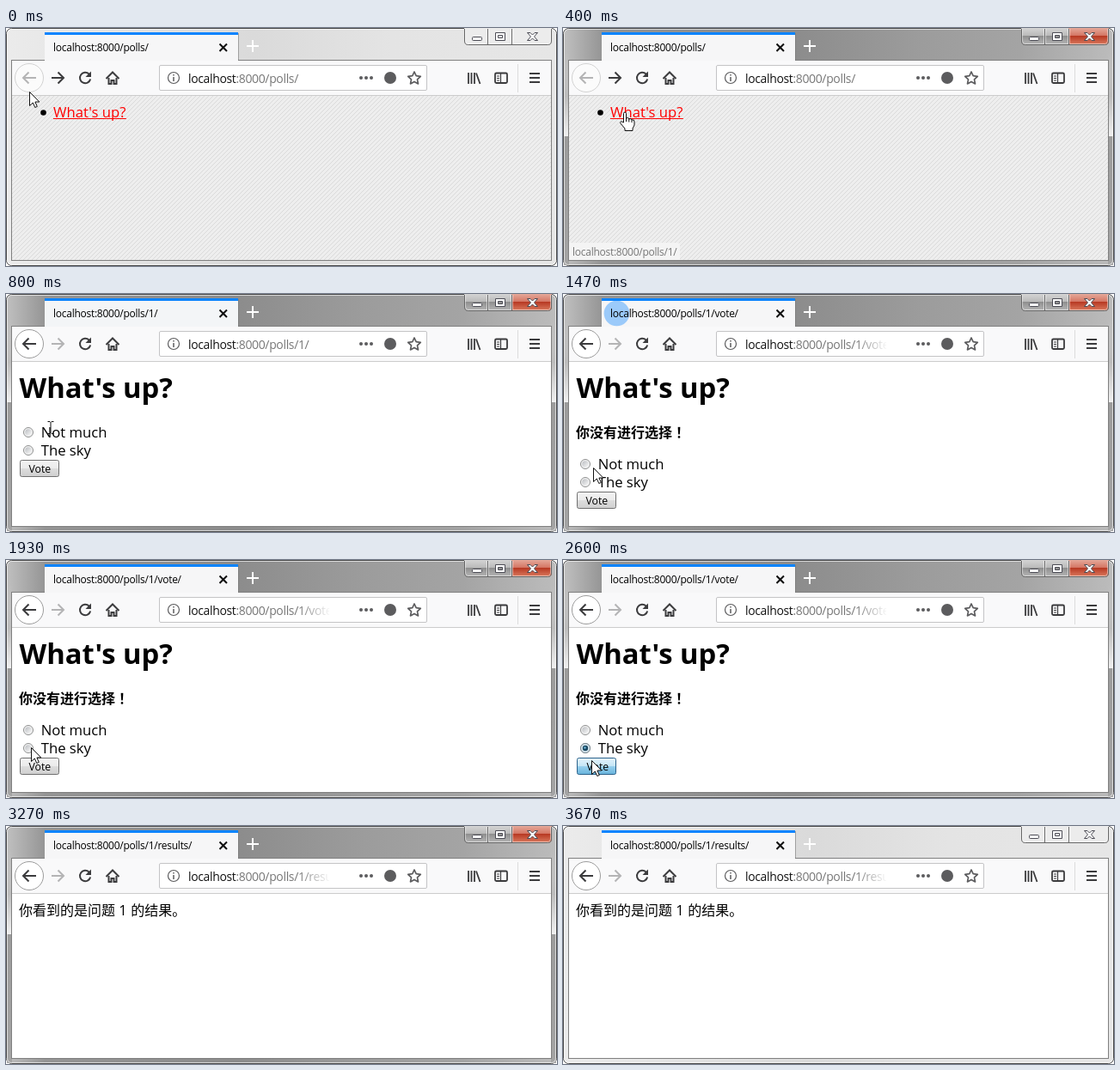
Animation of 641 by 277 pixels, one loop 3740 ms. Source, as an HTML page:

```html
<!DOCTYPE html>
<html lang="en">
<head>
<meta charset="utf-8">
<title>Polls</title>
<style>
html, body { margin: 0; width: 100%; height: 100%; overflow: hidden; background: #fff; }
svg { display: block; }
text { font: 16.7px "Open Sans", "Noto Sans", sans-serif; white-space: pre; }
.cjk { font: 16px "Noto Sans CJK SC", "Noto Sans CJK", sans-serif; }
.bold { font-weight: 700; }
.centered { font-family: "Noto Sans CJK JP", "Noto Sans CJK", sans-serif; }
#heading { font-size: 32.8px; font-weight: 700; }
#title, #status text { font-size: 12px; letter-spacing: -.26px; }
#url { font-size: 14px; letter-spacing: -.36px; }
#label { font-size: 12.3px; }
.icon { fill: none; stroke: #3b3b3d; stroke-width: 2; }
.thin { fill: none; stroke: #5c5c5e; stroke-width: 1.5; }
</style>
</head>
<body>
<svg width="641" height="277" viewBox="0 0 641 277">
  <defs>
    <linearGradient id="glassOn">
      <stop offset="0" stop-color="#c0c0c0"/><stop offset=".07" stop-color="#959595"/>
      <stop offset=".42" stop-color="#8c8c8c"/><stop offset=".65" stop-color="#9c9c9c"/>
      <stop offset=".83" stop-color="#a4a4a4"/><stop offset="1" stop-color="#bcbcbc"/>
    </linearGradient>
    <linearGradient id="glassOff">
      <stop offset="0" stop-color="#ebebeb"/><stop offset=".45" stop-color="#dadada"/>
      <stop offset=".7" stop-color="#e4e4e4"/><stop offset="1" stop-color="#e6e6e6"/>
    </linearGradient>
    <linearGradient id="side" x2="0" y2="1">
      <stop offset="0" stop-color="#ccc" stop-opacity="0"/><stop offset=".2" stop-color="#bcbcbc"/>
      <stop offset=".39" stop-color="#f0f0f0"/><stop offset=".39" stop-color="#9c9c9c"/>
      <stop offset="1" stop-color="#a4a4a4"/>
    </linearGradient>
    <linearGradient id="capOn" x2="0" y2="1">
      <stop offset="0" stop-color="#d4d4d4"/><stop offset=".48" stop-color="#b9b9b9"/>
      <stop offset=".5" stop-color="#8f8f8f"/><stop offset="1" stop-color="#b5b5b5"/>
    </linearGradient>
    <linearGradient id="closeOn" x2="0" y2="1">
      <stop offset="0" stop-color="#e5a899"/><stop offset=".48" stop-color="#d37462"/>
      <stop offset=".5" stop-color="#b83a24"/><stop offset="1" stop-color="#d9785c"/>
    </linearGradient>
    <linearGradient id="normal" x2="0" y2="1">
      <stop offset="0" stop-color="#f3f3f3"/><stop offset=".5" stop-color="#ebebeb"/>
      <stop offset=".5" stop-color="#ddd"/><stop offset="1" stop-color="#cfcfcf"/>
    </linearGradient>
    <linearGradient id="hover" x2="0" y2="1">
      <stop offset="0" stop-color="#eaf6fd"/><stop offset=".5" stop-color="#d9f0fc"/>
      <stop offset=".5" stop-color="#bee6fd"/><stop offset="1" stop-color="#a7d9f5"/>
    </linearGradient>
    <linearGradient id="pressed" x2="0" y2="1">
      <stop offset="0" stop-color="#e5f4fc"/><stop offset=".5" stop-color="#c4e5f6"/>
      <stop offset=".5" stop-color="#98d1ef"/><stop offset="1" stop-color="#68b3db"/>
    </linearGradient>
    <linearGradient id="bulb" x2="1" y2="1">
      <stop offset="0" stop-color="#b9bcc0"/><stop offset="1" stop-color="#fafafa"/>
    </linearGradient>
    <linearGradient id="fadeOut">
      <stop offset="0" stop-color="#fff" stop-opacity="0"/><stop offset="1" stop-color="#fff"/>
    </linearGradient>
    <pattern id="hatch" width="5" height="5" patternUnits="userSpaceOnUse">
      <rect width="5" height="5" fill="#eee"/>
      <path d="M-1 1l2-2M0 5l5-5M4 6l2-2" stroke="#dadada"/>
    </pattern>
    <clipPath id="tabClip"><path d="M45 8H270V38H45z"/></clipPath>
    <clipPath id="urlClip"><path d="M205 44H376V72H205z"/></clipPath>
    <clipPath id="capClip"><path d="M533 0H635V15Q635 19 631 19H537Q533 19 533 15z"/></clipPath>
    <g id="radio"><circle r="5.5" fill="#f4f4f4" stroke="#8e8f8f"/><circle r="3.8" fill="url(#bulb)"/></g>
  </defs>

  <!-- window frame -->
  <rect id="frame" x=".5" y=".5" width="640" height="276" rx="6" stroke="#4a4a4a"/>
  <path id="sides" d="M1 30H7V276H1zM634 30H640V276H634z" fill="url(#side)"/>
  <rect x="1.5" y="1.5" width="638" height="274" rx="5" fill="none" stroke="#fff" stroke-opacity=".65"/>
  <g clip-path="url(#capClip)">
    <path id="caps" d="M533 0H588V19H533z"/>
    <path id="close" d="M588 0H635V19H588z"/>
  </g>
  <path d="M534.5 1V15Q534.5 18.5 537.5 18.5H559.5V1M561.5 1V18.5H587.5V1M589.5 1V18.5H630.5Q633.5 18.5 633.5 15V1" fill="none" stroke="#fff" stroke-opacity=".5"/>
  <path d="M533.5 1V15Q533.5 19.5 537.5 19.5H630.5Q634.5 19.5 634.5 15V1M560.5 1V19M588.5 1V19" fill="none" stroke="#666"/>
  <g fill="#fff" stroke="#4c4c55">
    <rect x="542.5" y="10.5" width="11" height="4" rx="1"/>
    <path d="M569.5 5.5h11v9h-11zM572.5 8.5v3h5v-3z" fill-rule="evenodd"/>
    <path d="M606.5 5.5h3.5l2.5 2.5 2.5-2.5h3.5l-4 4.5 4 4.5h-3.5l-2.5-2.5-2.5 2.5h-3.5l4-4.5z"/>
  </g>
  <path d="M280 21H294M287 14V28" stroke="#fff" stroke-width="2"/>

  <!-- content and toolbar -->
  <rect x="6.5" y="37.5" width="628" height="233" fill="#fff" stroke="#808080"/>
  <path d="M7 38H634V78H7z" fill="#f9f9fa"/>
  <path d="M7 78.5H634" stroke="#ccc"/>
  <path d="M45 5H270V38H45z" fill="#f6f6f7"/>
  <path d="M270.5 6V38" stroke="#777" stroke-opacity=".6"/>
  <circle id="burst" cx="62.5" cy="22.5" fill="#0a84ff" clip-path="url(#tabClip)"/>
  <path d="M45 5H270V8H45z" fill="#0a84ff"/>
  <text id="title" x="55" y="27"/>
  <path d="M248.5 18.5l8.5 8.5M257 18.5l-8.5 8.5" class="icon" style="stroke:#111"/>

  <circle id="ring" cx="27" cy="58" r="16.5"/>
  <path id="back" class="icon" d="M20 58H35M26.5 51.5L20 58l6.5 6.5"/>
  <path id="forward" class="icon" d="M53 58H67M60.5 51.5L67 58l-6.5 6.5"/>
  <path class="icon" d="M96.5 53.5A6.2 6.2 0 1 0 98.2 59.5"/>
  <path d="M99 50.5V57h-6.5z" fill="#3b3b3d"/>
  <path class="icon" d="M116.5 59L124 51.5L131.5 59"/>
  <path class="icon" d="M119.5 58V65H122.500V61H125.500V65H128.500V58"/>
  <rect x="178.5" y="43.5" width="311" height="29" rx="1.5" fill="#fff" stroke="#c4c4c6"/>
  <circle cx="195" cy="58" r="6.5" class="thin" style="stroke-width:1.2"/>
  <path d="M195 57V62M195 54V55.5" class="thin"/>
  <text id="url" x="212" y="64" clip-path="url(#urlClip)" fill="#777"><tspan fill="#111">localhost</tspan><tspan id="path"/></text>
  <path id="fade" d="M340 46H378V70H340z" fill="url(#fadeOut)"/>
  <g fill="#5c5c5e">
    <circle cx="413" cy="58" r="2"/><circle cx="419" cy="58" r="2"/><circle cx="425" cy="58" r="2"/>
    <circle cx="447" cy="58" r="7"/>
  </g>
  <path class="thin" stroke-linejoin="round" style="stroke-width:1.7" d="M475 51l2.2 4.7 5.1.6-3.8 3.5 1 5.1-4.5-2.5-4.5 2.5 1-5.1-3.8-3.5 5.1-.6z"/>
  <path class="icon" style="stroke-width:1.8" d="M538 52V65M541.5 52V65M545 52V65M547 52.5L551.5 65"/>
  <rect x="569" y="52.5" width="14" height="11.5" rx="1.5" class="icon" style="stroke-width:1.8"/>
  <path d="M575.5 52V64M571 56H574M571 58.5H574M571 61H574" class="icon" style="stroke-width:1.2"/>
  <path d="M595.5 42V75" stroke="#dcdcdc"/>
  <path class="icon" d="M609 53H621M609 58H621M609 63H621"/>

  <!-- pages -->
  <g id="list">
    <path d="M7 79H634V270H7z" fill="url(#hatch)"/>
    <circle cx="43.5" cy="98.5" r="3.3"/>
    <text x="55" y="104" fill="#f00">What's up?</text>
    <path d="M55 105.5H140" stroke="#f00"/>
    <g id="status">
      <path d="M7 250H133Q136 250 136 253V270H7z" fill="#f4f4f4"/>
      <text x="11" y="265" fill="#777">localhost:8000/polls/1/</text>
    </g>
  </g>
  <g id="poll">
    <text id="heading" x="15.5" y="121">What's up?</text>
    <text id="error" class="cjk bold" x="15" y="167">你没有进行选择<tspan class="centered">！</tspan></text>
    <g id="form">
      <use href="#radio" x="26" y="161"/><text x="40.7" y="167">Not much</text>
      <use href="#radio" x="26" y="182"/><text x="40.7" y="188">The sky</text>
      <g id="picked">
        <circle cx="26" cy="182" r="5.5" fill="#d8e8f0" stroke="#7b8890"/>
        <circle cx="26" cy="182" r="3.2" fill="#1d4a63"/><circle cx="25.5" cy="181.5" r="1.2" fill="#6bb4d8"/>
      </g>
      <rect id="button" x="16.5" y="193.5" width="45" height="19" rx="2"/>
      <text id="label" x="26.5" y="208">Vote</text>
    </g>
  </g>
  <text id="results" class="cjk" x="15" y="104">你看到的是问题<tspan style="font:16.7px 'Open Sans',sans-serif"> 1 </tspan>的结果。</text>

  <!-- pointers, hot spot at the origin -->
  <g id="pointer" stroke="#111" fill="#fff">
    <path id="arrow" d="M-.5 .5V16.5L3.3 13L5.8 18.5L8.3 17.4L5.9 12H10.8z"/>
    <path id="hand" d="M-1.5 12V1.5Q-1.5 0 0 0T1.5 1.5V7Q4.5 5.5 4.8 8Q7.5 6.5 8 9Q11 8 11 11V15L9 19V21.5H0V19L-5.5 12.5Q-5 9.5-1.5 12zM1.5 7V11M4.8 8V11.5M8 9V12"/>
    <path id="beam" fill="none" d="M-3.5-6.5H-1L0-5.5L1-6.5H3.5M0-5.5V6.5M-3.5 7.5H-1L0 6.5L1 7.5H3.5"/>
  </g>
</svg>
<script>
const LOOP = 3740, STEP = 1000 / 15;
const paths = ['', '1/', '1/vote/', '1/results/'];
const loads = [0, 530, 1399, 2730];
const bursts = [470, 1458, 2733];
// time, x, y
const route = [
  [0, 28, 74], [67, 28, 74], [333, 70, 97], [400, 72, 98], [533, 72, 98],
  [800, 52, 155], [933, 35, 176], [1000, 35, 176], [1200, 36, 202], [1533, 36, 202],
  [2000, 28, 225], [2133, 28, 225], [2400, 34, 233], [2733, 34, 233], [2867, 34, 231],
  [3067, 34, 231], [3133, 33, 243], [3200, 29, 260], [3267, 28, 290], [LOOP, 28, 290]
];
const $ = id => document.getElementById(id);
const show = (id, on) => { $(id).style.display = on ? '' : 'none'; };
const set = (id, attrs) => { for (const k in attrs) $(id).setAttribute(k, attrs[k]); };

function position(t) {
  const i = route.findIndex(p => p[0] > t);
  const [t0, x0, y0] = route[i - 1], [t1, x1, y1] = route[i];
  const u = (t - t0) / (t1 - t0);
  return [Math.round(x0 + (x1 - x0) * u), Math.round(y0 + (y1 - y0) * u)];
}

function drawWindow(active, page) {
  set('frame', { fill: active ? 'url(#glassOn)' : 'url(#glassOff)' });
  show('sides', active);
  set('caps', { fill: active ? 'url(#capOn)' : '#ececec' });
  set('close', { fill: active ? 'url(#closeOn)' : '#ececec' });
  const path = ':8000/polls/' + paths[page];
  $('title').textContent = 'localhost' + path;
  $('path').textContent = path;
  show('fade', page > 1);
  set('ring', { fill: page ? '#fff' : '#fbfbfb', stroke: page ? '#9c9c9c' : '#d2d2d2' });
  $('back').style.stroke = page ? '' : '#b4b4b5';
  $('forward').style.stroke = page ? '#b4b4b5' : '';
}

function drawBurst(t) {
  const start = bursts.find(b => t >= b && t < b + 375);
  show('burst', start !== undefined);
  if (start === undefined) return;
  const p = 1 - (1 - (t - start) / 375) ** 1.65;
  set('burst', { r: 6 + 234 * p, opacity: 0.4 * (1 - p) });
}

function drawPage(t, page, x, y) {
  const shift = page === 2 ? 37 : 0;
  const overLink = page === 0 && x > 54 && y > 90;
  const overText = page === 1 && (y < 128 || y > 150 && y < 170 && x > 40);
  const over = y >= 193 + shift;
  const down = t >= 1265 && t < 1330 || t >= 2599 && t < 2665;
  const look = down ? 'pressed' : over ? 'hover' : 'normal';
  show('list', page === 0);
  show('status', overLink);
  show('poll', page === 1 || page === 2);
  show('error', page === 2);
  show('results', page === 3);
  show('picked', t >= 2130);
  set('form', { transform: `translate(0 ${shift})` });
  set('button', { fill: `url(#${look})`, stroke: { normal: '#707070', hover: '#3c7fb1', pressed: '#2c628b' }[look] });
  set('label', { transform: down ? 'translate(1 0)' : '' });
  set('pointer', { transform: `translate(${x} ${y})` });
  show('hand', overLink);
  show('beam', overText);
  show('arrow', !overLink && !overText);
}

const begin = performance.now();
function draw() {
  const now = (performance.now() - begin) % LOOP;
  const t = Math.floor(now / STEP) * STEP;
  const page = loads.filter(l => t >= l).length - 1;
  drawWindow(t > 60 && t < 3660, page);
  drawBurst(t);
  drawPage(t, page, ...position(t));
  requestAnimationFrame(draw);
}
draw();
</script>
</body>
</html>
```
